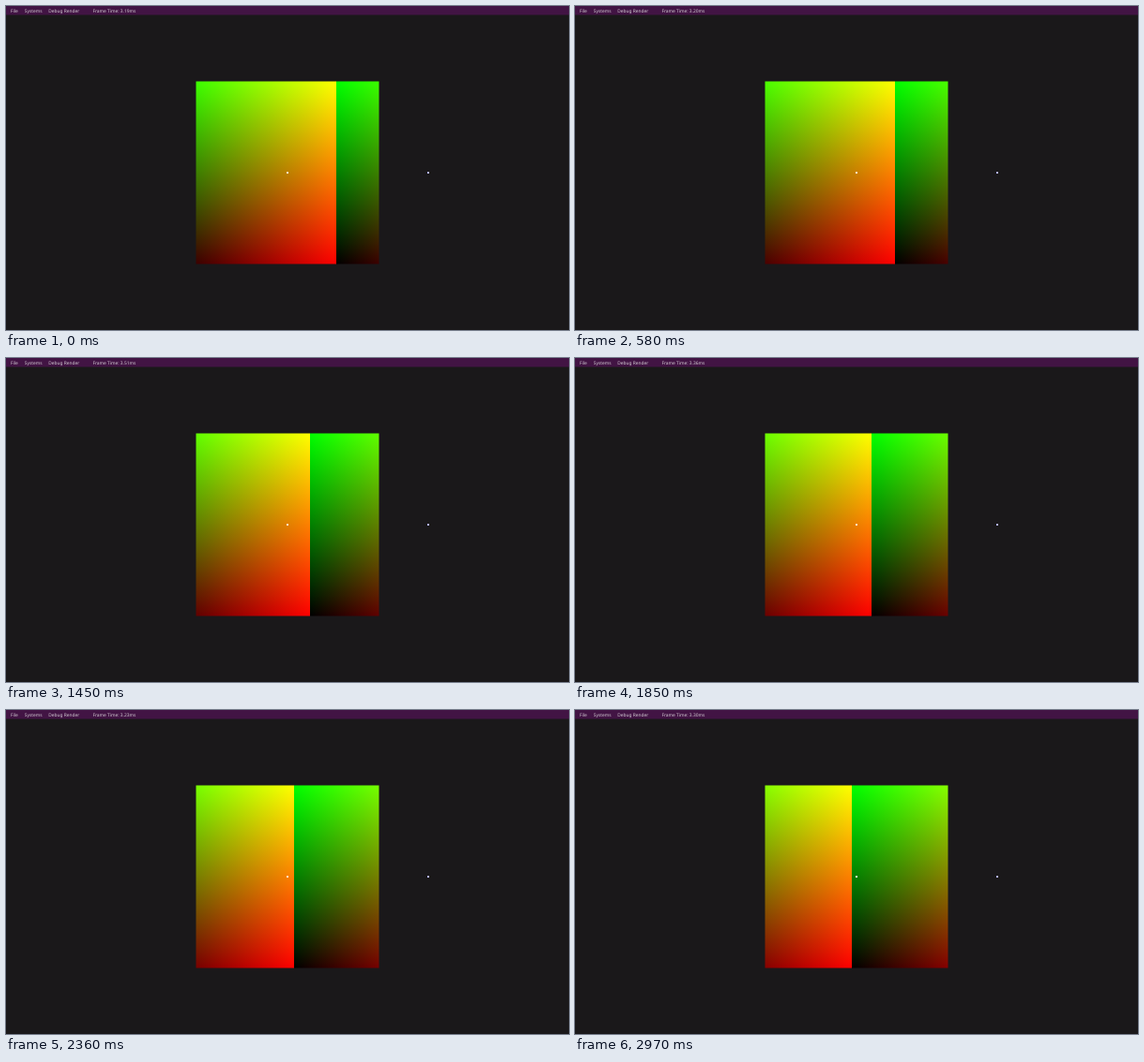
An HTML page with a canvas for the animation above (3 s loop, 600x346 px).

```html
<!DOCTYPE html>
<html lang="en">
<head>
<meta charset="utf-8">
<title>Scrolling UV gradient</title>
<style>
  html, body { margin: 0; width: 100%; height: 100%; overflow: hidden; background: #1a181a; }
  canvas, svg { position: absolute; left: 0; top: 0; width: 600px; height: 346px; display: block; }
  text { font: 4.85px "Noto Sans", "Open Sans", sans-serif; fill: #d2cad2; text-rendering: geometricPrecision; }
</style>
</head>
<body>
<canvas id="view" width="600" height="346"></canvas>
<svg viewBox="0 0 600 346">
  <rect width="600" height="9.5" fill="#421444"/>
  <text x="5" y="6.8">File</text>
  <text x="19.8" y="6.8">Systems</text>
  <text x="45.3" y="6.8">Debug Render</text>
  <text id="timing" x="92.4" y="6.8"></text>
</svg>
<script>
  const LOOP = 3000;
  const quad = { x: 202.5, y: 80.5, size: 195 };
  const seam = { start: 352.2, speed: -0.0193 };
  // [time in ms, displayed frame time]
  const readings = [[0, 3.19], [580, 3.20], [970, 3.24], [1450, 3.51],
                    [1850, 3.36], [2360, 3.23], [2970, 3.30], [3000, 3.30]];

  const ctx = document.getElementById('view').getContext('2d');
  const timing = document.getElementById('timing');

  function readingAt(t) {
    const i = readings.findIndex(r => r[0] > t);
    const [t0, a] = readings[i - 1], [t1, b] = readings[i];
    return a + (b - a) * (t - t0) / (t1 - t0);
  }

  function ramp(x0, y0, x1, y1, from, to) {
    const g = ctx.createLinearGradient(x0, y0, x1, y1);
    g.addColorStop(0, from);
    g.addColorStop(1, to);
    return g;
  }

  function fill(style, x, y, w, h) {
    ctx.fillStyle = style;
    ctx.fillRect(x, y, w, h);
  }

  function draw(t) {
    const { x, y, size } = quad;
    const edge = Math.round(seam.start + seam.speed * t);
    const redRamp = start => ramp(start, 0, start + size, 0, '#000', '#f00');

    ctx.globalCompositeOperation = 'source-over';
    fill('#1a181a', 0, 0, 600, 346);
    fill(redRamp(edge - size), x, y, edge - x, size);
    fill(redRamp(edge), edge, y, x + size - edge, size);

    // the green channel is added over the wrapped red one
    ctx.globalCompositeOperation = 'lighter';
    fill(ramp(0, y, 0, y + size, '#0f0', '#000'), x, y, size, size);

    ctx.globalCompositeOperation = 'source-over';
    fill('#fff0d0', 299, 177, 2, 2);
    fill('#b4b4ff', 449, 177, 2, 2);

    timing.textContent = 'Frame Time: ' + readingAt(t).toFixed(2) + 'ms';
  }

  const begin = performance.now();
  function tick() {
    draw((performance.now() - begin) % LOOP);
    requestAnimationFrame(tick);
  }
  tick();
</script>
</body>
</html>
```
